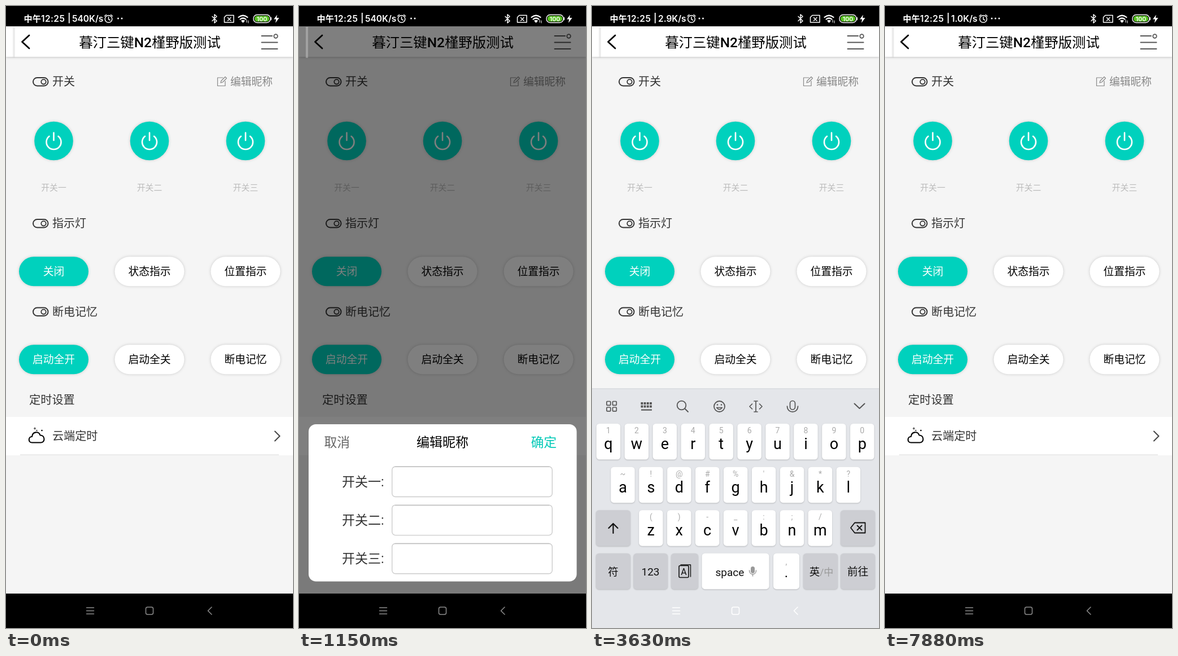
An HTML page for the animation above (8000 ms loop, 508 px wide and 1102 px high).

```html
<!DOCTYPE html>
<html lang="zh-CN">
<head>
<meta charset="utf-8">
<style>
  html, body { margin: 0; width: 100%; height: 100%; overflow: hidden; background: #000; }
  svg { display: block; font-family: Roboto, "Noto Sans CJK SC", "Noto Sans CJK", sans-serif; }
  .soft { filter: drop-shadow(0 0 2.5px rgba(0, 0, 0, .18)); }
  .key { filter: drop-shadow(0 1px 1px rgba(0, 0, 0, .2)); }
  .status { font-family: Inter, "Noto Sans CJK SC", "Noto Sans CJK", sans-serif; font-weight: 600; }
</style>
</head>
<body>
<svg id="stage" width="508" height="1102" viewBox="0 0 508 1102"></svg>
<script>
const TEAL = '#00d1bd', INK = '#333', KEY_GRAY = '#cdced3';
const COLUMNS = [84.5, 254, 424];
const NUMERALS = ['一', '二', '三'];

// Text is placed by the vertical centre of its Chinese glyph box.
const text = (x, cy, size, str, fill = INK, anchor = 'start') =>
  `<text x="${x}" y="${cy + size * .38}" font-size="${size}" fill="${fill}" text-anchor="${anchor}">${str}</text>`;
const centered = (x, cy, size, str, fill) => text(x, cy, size, str, fill, 'middle');
const rect = (x, y, w, h, fill, r = 0, extra = '') =>
  `<rect x="${x}" y="${y}" width="${w}" height="${h}" rx="${r}" fill="${fill}" ${extra}/>`;
const line = (d, color = INK, w = 2) =>
  `<path d="${d}" fill="none" stroke="${color}" stroke-width="${w}" stroke-linecap="round" stroke-linejoin="round"/>`;
const ring = (x, y, r, color = INK, w = 2) =>
  `<circle cx="${x}" cy="${y}" r="${r}" fill="none" stroke="${color}" stroke-width="${w}"/>`;
const dot = (x, y, r, fill) => `<circle cx="${x}" cy="${y}" r="${r}" fill="${fill}"/>`;
const at = (x, y, body) => `<g transform="translate(${x} ${y})">${body}</g>`;

const statusBar = () => rect(0, 0, 508, 36, '#000') +
  `<g class="status">${text(31.5, 22, 15.2, '中午', '#fff')}
    <g fill="#fff" font-size="15.5"><text x="62" y="28" letter-spacing=".4">12:25</text>
    <text x="109" y="27">|</text><text id="speed" x="117" y="28"></text></g></g>
  <g id="alarm">${ring(0, 23, 6.3, '#fff', 1.5) + line('M0 19.5V23.5L2.5 25M-7 18L-4 15.5M7 18L4 15.5', '#fff', 1.5)}</g>
  <g id="dots">${[0, 6.5, 13].map(x => dot(x, 22, 1.5, '#fff')).join('')}</g>` +
  line('M365 18.5L373 26.5L369 30V15L373 18.5L365 26.5', '#fff', 1.5) +
  line('M390 16.5H403V29H386.5V20ZM392.5 20.5L398 26M398 20.5L392.5 26', '#fff', 1.5) +
  line('M411.5 20Q419.5 13.5 427.5 20M414.5 23.5Q419.5 19.5 424.5 23.5', '#fff', 2.2) +
  '<path d="M416 26Q419.5 23.5 423 26L419.5 30Z" fill="#fff"/>' +
  line('M426 25V29M429 26V30', '#fff', 1) +
  rect(438, 15.5, 30, 14, '#000', 6.5, 'stroke="#fff" stroke-width="1.4"') +
  rect(440, 17.5, 26, 10, '#58c322', 4.5) +
  '<g class="status"><text x="453" y="26.5" font-size="10.5" fill="#fff" text-anchor="middle">100</text></g>' +
  rect(468.5, 20, 1.5, 5, '#fff') +
  '<path d="M480 15.5L474 23.5H478L477 30L483.5 21H479Z" fill="#fff"/>';

const header = () => rect(0, 36, 508, 54, '#fff', 0, 'style="filter:drop-shadow(0 1px 2px rgba(0,0,0,.2))"') +
  line('M41 52L28.5 63.5L41 75', '#000', 2.8) +
  centered(254.5, 63.5, 24.4, '暮汀三键<tspan font-weight="500">N2</tspan>槿野版测试', '#000') +
  line('M452.5 53H471M452.5 64.5H480.5M452.5 76H480.5', '#555', 2) + ring(477.5, 53.5, 3.3, '#555', 1.7);

const section = (cy, label) =>
  rect(48, cy - 6.5, 26.5, 14.5, 'none', 7.2, `stroke="${INK}" stroke-width="2"`) +
  ring(66.5, cy + .8, 4.2, INK, 1.8) + text(82, cy, 20, label);

const powerButton = (x, i) =>
  `<circle class="soft" cx="${x}" cy="239" r="34.3" fill="${TEAL}"/>` +
  at(x, 241, line('M-8 -10.2A13 13 0 1 0 8 -10.2M0 -16.5V-3', '#fff', 2.6)) +
  centered(x, 321.5, 14.8, '开关' + NUMERALS[i], '#bbb');

const pills = (cy, labels) => labels.map((label, i) =>
  rect(COLUMNS[i] - 61.5, cy - 26, 123, 52, i ? '#fff' : TEAL, 26, 'class="soft"') +
  centered(COLUMNS[i], cy - .5, 18.8, label, i ? '#000' : '#fff')).join('');

const page = () => rect(0, 36, 508, 1005, '#f5f5f5') + header() +
  section(133.5, '开关') +
  line('M384 127H374.5V141.5H388V133M380 136L381 132.5L388 125.5L390.5 128L383.5 135Z', '#888', 1.2) +
  text(397, 133.5, 18.8, '编辑昵称', '#888') +
  COLUMNS.map(powerButton).join('') +
  section(384.5, '指示灯') + pills(470.3, ['关闭', '状态指示', '位置指示']) +
  section(541, '断电记忆') + pills(626.3, ['启动全开', '启动全关', '断电记忆']) +
  text(41, 697, 20.2, '定时设置') +
  rect(0, 728, 508, 68, '#fff') + rect(25, 794.5, 458, 1.3, '#e2e2e2') +
  line('M46 773.5C39 773.5 39 763 46 763C47 753.5 58 753 60.5 760.5C69.5 760.5 69.5 773.5 62 773.5Z', '#000', 2.1) +
  ring(51, 748.5, 1.2, '#000', 1) + dot(54.5, 752, 1, '#000') + dot(63.5, 752, 1.3, '#000') +
  text(82, 761.5, 20.1, '云端定时') + line('M476 753.5L484.5 762L476 770.5', '#444', 2);

const field = (label, i) => {
  const y = 75 + i * 68.1;
  return text(76, y + 25.8, 23, `开关${label}:`) +
    rect(164.7, y, 283.5, 53.5, '#fff', 6, 'stroke="#ccc" stroke-width="1.4"') +
    line(`M170 ${y + .5}H443`, '#bbb', 1.2);
};

const sheet = () => rect(17, 0, 474.5, 278.5, '#fff', 13) +
  text(44.5, 31.5, 22.8, '取消', '#666') +
  centered(254, 31.5, 23, '编辑昵称', '#000') +
  text(410.5, 31.5, 22.8, '确定', '#00c9b7') +
  NUMERALS.map(field).join('') +
  `<g id="focus">${rect(164.7, 75, 283.5, 53.5, 'none', 6,
    'stroke="#1cc4b6" stroke-width="1.6" style="filter:drop-shadow(0 0 1.5px rgba(0,209,189,.6))"')}</g>` +
  rect(165.3, 88, 1.6, 28, '#0b6f69', 0, 'id="caret"');

const key = (x, y, w, fill = '#fff') => rect(x, y, w, 63.5, fill, 5.5, 'class="key"');
const keyRow = (x, y, letters, hints) => [...letters].map((letter, i) => {
  const left = x + i * 49.92, mid = left + 21.2;
  return key(left, y, 42.4) +
    `<text x="${mid}" y="${y + 17}" font-size="14" fill="#aaa" text-anchor="middle">${hints[i]}</text>` +
    `<text x="${mid}" y="${y + 45}" font-size="27" fill="#000" text-anchor="middle">${letter}</text>`;
}).join('');

const toolbar = () => {
  const squares = [26, 36.5].map(x => [700.5, 711].map(y =>
    rect(x, y, 6.8, 6.8, 'none', 1, 'stroke="#555" stroke-width="1.7"')).join('')).join('');
  const smallKeys = [0, 1].map(row => [0, 1, 2, 3].map(col =>
    rect(86.5 + col * 5.2, 702 + row * 5.5, 3.8, 4, '#555')).join('')).join('');
  return squares + smallKeys + rect(87, 714.5, 19, 2.2, '#555') +
    ring(158.5, 707.5, 7.8, '#555', 1.8) + line('M164.5 713.5L170 719', '#555', 1.8) +
    ring(225.5, 709.5, 9.5, '#555', 1.8) + dot(222, 706.5, 1.3, '#555') + dot(229, 706.5, 1.3, '#555') +
    line('M220.5 711.5Q225.5 718 230.5 711.5Z', '#555', 1.5) +
    line('M283.5 705L279 709.5L283.5 714M296.5 705L301 709.5L296.5 714M287 700H293M290 700V719M287 719H293', '#555', 1.7) +
    rect(350.5, 699.5, 9, 15.5, 'none', 4.5, 'stroke="#555" stroke-width="1.7"') +
    line('M345.5 709C345.5 722.5 364.5 722.5 364.5 709', '#555', 1.7) +
    line('M464.5 704.5L473.5 713L482.5 704.5', '#555', 2);
};

const keyboard = () => rect(0, 677.5, 508, 425, '#e4e6ea') + rect(0, 677.5, 508, 1, '#d3d5d9') + toolbar() +
  keyRow(7.8, 740, 'qwertyuiop', '1234567890') +
  keyRow(33.3, 816.7, 'asdfghjkl', "~!@#%'&*?") +
  keyRow(83.1, 893.2, 'zxcvbnm', '()-_:;/') +
  key(7, 893.2, 61, KEY_GRAY) + line('M37.5 934V917M29.5 925L37.5 917L45.5 925', '#111', 2.2) +
  key(440, 893.2, 61, KEY_GRAY) +
  line('M465 915.5H483.5V933.5H465L458 924.5ZM469.5 920.5L477.5 928.5M477.5 920.5L469.5 928.5', '#111', 1.8) +
  key(7, 969.7, 61, KEY_GRAY) + centered(37.5, 1002, 18.5, '符', '#111') +
  key(73.5, 969.7, 60.5, KEY_GRAY) + centered(103.5, 1002, 19, '123', '#111') +
  key(140, 969.7, 48, KEY_GRAY) + rect(154, 991.5, 17, 21, 'none', 2, 'stroke="#111" stroke-width="1.6"') +
  line('M157 990H174.5V1011', '#111', 1.4) + centered(162.5, 1002, 16, 'A', '#111') +
  key(194.5, 969.7, 119) + text(218.5, 1002.5, 19, 'space', '#111') +
  rect(281, 993, 7, 12, '#999', 3.5) + line('M278.5 1000C278.5 1009 290.5 1009 290.5 1000M284.5 1007V1010', '#999', 1.5) +
  key(321, 969.7, 46) + centered(344, 985, 14, ',', '#aaa') + centered(344, 1002.5, 24, '.', '#000') +
  key(374, 969.7, 61, KEY_GRAY) + centered(406, 1002, 18.5, '英<tspan fill="#999" font-size="17">/中</tspan>', '#111') +
  key(440, 969.7, 61, KEY_GRAY) + centered(470.5, 1002, 18.8, '前往', '#111');

const navIcons = () => `<g id="nav" fill="none" stroke-width="1.5" stroke-linecap="round" stroke-linejoin="round">
  <path d="M142.5 1066H155.5M142.5 1071.5H155.5M142.5 1077H155.5M364 1065L357.5 1071.5L364 1078"/>
  <rect x="247.5" y="1065" width="13" height="13" rx="3"/></g>`;

const stage = document.getElementById('stage');
stage.innerHTML = `<defs><linearGradient id="fade" x2="0" y2="1">
    <stop stop-color="#f3f4f4"/><stop offset=".12" stop-color="#f5f8f7"/>
    <stop offset=".55" stop-color="#fafafa"/><stop offset=".7" stop-color="#fdfdfd"/><stop offset="1" stop-color="#fff"/>
  </linearGradient></defs>` +
  page() + rect(0, 36, 508, 1005, '#000', 0, 'id="scrim"') +
  rect(12, 37, 4, 55, '#d0d0d0', 0, 'opacity=".41"') +
  `<g id="sheet">${sheet()}</g>` + rect(0, 677.5, 508, 364, 'url(#fade)', 0, 'id="blank"') +
  rect(0, 1041, 508, 61, '#000') + `<g id="keyboard">${keyboard()}</g>` + navIcons() + statusBar();

const parts = Object.fromEntries([...stage.querySelectorAll('[id]')].map(el => [el.id, el]));
const move = (el, x, y) => el.setAttribute('transform', `translate(${x} ${y})`);
const show = (el, on) => el.setAttribute('visibility', on ? 'inherit' : 'hidden');
const progress = (t, from, to) => Math.min(1, Math.max(0, (t - from) / (to - from)));
const easeOut = (p, power = 2) => 1 - (1 - p) ** power;

const OPEN = 905, FOCUS = 2350, RESIZE = 2600, CLOSE = 3630;

function draw(t) {
  const opened = t >= OPEN && t < CLOSE;
  const enter = progress(t, OPEN, OPEN + 200);
  const resized = t >= RESIZE && t < CLOSE;

  parts.scrim.setAttribute('opacity', opened ? .5 * easeOut(enter) : 0);
  show(parts.sheet, opened);
  move(parts.sheet, 0, resized ? 379.3 : 741 + 340 * (1 - enter ** 2.8));
  parts.focus.setAttribute('opacity', progress(t, FOCUS, FOCUS + 200));
  show(parts.caret, opened && t >= 2400 && (t - 2400) % 1000 < 500);
  show(parts.blank, resized);

  const rise = easeOut(progress(t, 2680, 2920), 3);
  const fall = progress(t, CLOSE + 20, CLOSE + 240) ** 1.6;
  const up = rise * (1 - fall);
  show(parts.keyboard, up > 0);
  move(parts.keyboard, 0, 425 * (1 - up));
  parts.nav.setAttribute('stroke', resized || up > 0 ? '#fff' : '#8c8c8c');

  const [speed, alarmX, dotsX] =
    t < 3130 ? ['540K/s', 181.5, 198.5] :
    t < 7180 ? ['2.9K/s', 176, 190] : ['1.0K/s', 174, 189];
  parts.speed.textContent = speed;
  move(parts.alarm, alarmX, 0);
  move(parts.dots, dotsX, 0);
  show(parts.dots.lastElementChild, t > CLOSE + 30);
}

function frame() {
  draw(performance.now() % 8000);
  requestAnimationFrame(frame);
}
frame();
</script>
</body>
</html>
```
